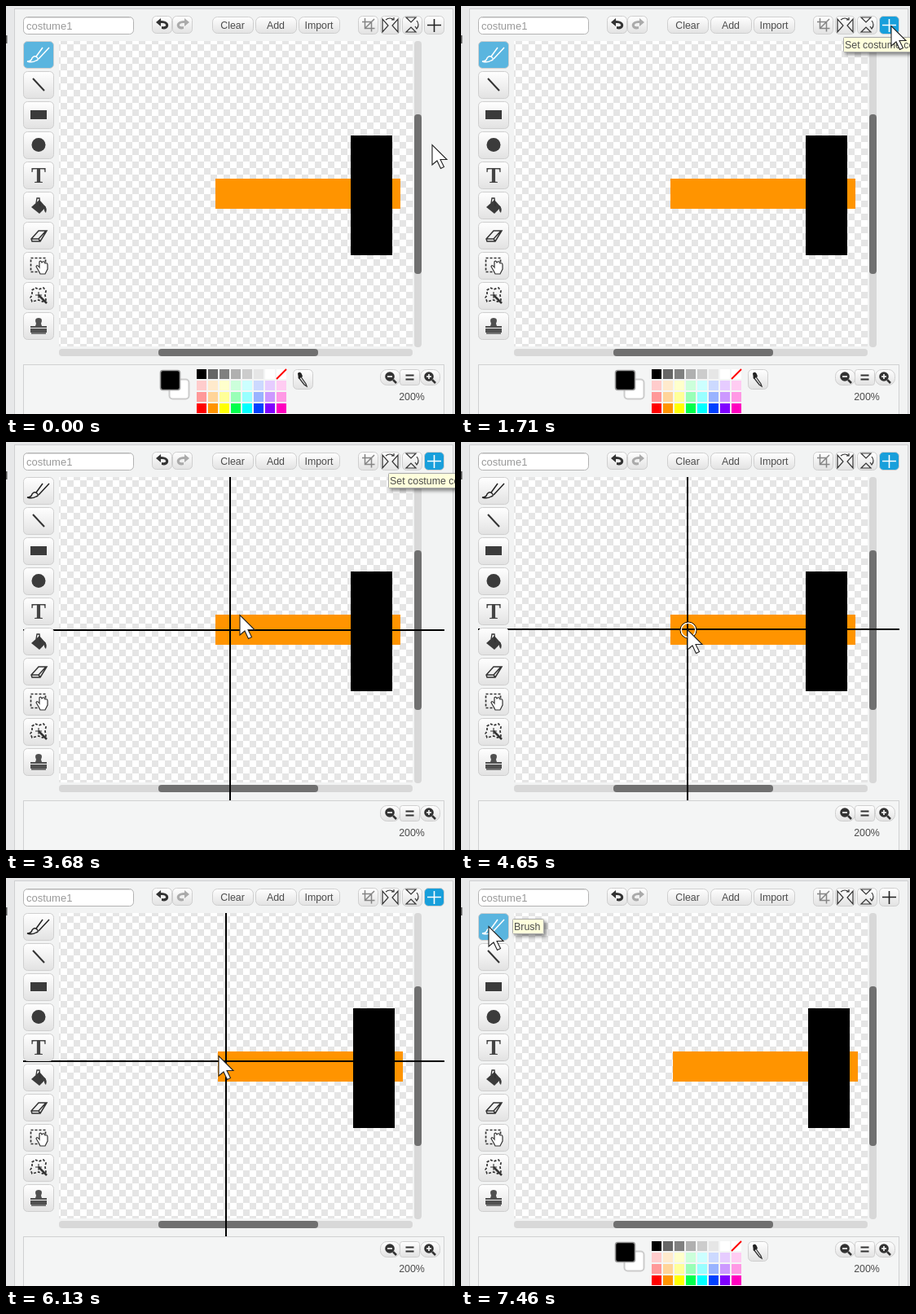
Animation of 551x501 px, one loop 8000 ms. Source, as an HTML page:

```html
<!DOCTYPE html>
<html lang="en">
<head>
<meta charset="utf-8">
<title>Set costume center</title>
<style>
  html, body { margin: 0; width: 100%; height: 100%; overflow: hidden; background: #e7e8e9; }
  svg { display: block; font-family: "Liberation Sans", Arial, sans-serif; font-size: 12.4px; }
</style>
</head>
<body>
<svg id="stage" width="551" height="501" viewBox="0 0 551 501">
  <defs>
    <linearGradient id="face" x2="0" y2="1">
      <stop offset="0" stop-color="#fff"/><stop offset="1" stop-color="#e2e2e2"/>
    </linearGradient>
    <pattern id="checker" x="51" y="31" width="16" height="16" patternUnits="userSpaceOnUse">
      <path fill="#fff" d="M0 0h16v16H0z"/><path fill="#e5e5e5" d="M8 0h8v8H8zM0 8h8v8H0z"/>
    </pattern>
    <filter id="shadow" x="-20%" y="-30%" width="150%" height="200%">
      <feDropShadow dx="3" dy="3" stdDeviation="2" flood-opacity=".45"/>
    </filter>
    <clipPath id="work"><path d="M65 43h434v375H65z"/></clipPath>
    <clipPath id="crossArea"><path d="M21 43h517v397H21z"/></clipPath>
  </defs>
</svg>
<script>
const stage = document.getElementById('stage');
const LOOP = 8000, HOVER = 1100, CLICK = 2330, PRESS = 4650, RELEASE = 5510, LEAVE = 6130, BRUSH = 7220;

const rect = (x, y, w, h, fill, r = 0, more = '') =>
  `<rect x="${x}" y="${y}" width="${w}" height="${h}" rx="${r}" fill="${fill}" ${more}/>`;
const button = (x, y, w, h, r = 5, id = '') =>
  rect(x + .5, y + .5, w - 1, h - 1, 'url(#face)', r, `stroke="#cfcfcf" ${id && `id="${id}"`}`);
const line = (d, color = '#333', width = 1.5, more = '') =>
  `<path d="${d}" fill="none" stroke="${color}" stroke-width="${width}" ${more}/>`;
const solid = (d, fill = '#3b3b3b', more = '') => `<path d="${d}" fill="${fill}" ${more}/>`;
const text = (x, y, s, more = '') => `<text x="${x}" y="${y}" fill="#4c4c4c" ${more}>${s}</text>`;
const group = (id, body, more = '') => `<g id="${id}" ${more}>${body}</g>`;

function topBar() {
  const labels = ['Clear', 'Add', 'Import'].map((s, i) =>
    button(253 + 53 * i, 13, 51, 21, 6) + text(278 + 53 * i, 28, s, 'text-anchor="middle"'));
  const undo = 'M184 20l6 -5v3c8 0 10 4 9 7c-1 3 -4 4 -8 3v-3c4 1 6 -1 5 -2c-1 -2 -3 -2 -6 -2v4z';
  const arrow = 'M462 16v16l7 -8z';
  return rect(21.5, 13.5, 135, 21, '#fff', 5, 'stroke="#b3b3b3"')
    + line('M24 14.5h130', '#ddd', 1) + text(25, 29, 'costume1', 'font-size="13" style="fill:#999"')
    + button(179, 12, 25, 22) + button(204, 12, 25, 22)
    + solid(undo, '#333') + solid(undo, '#aaa', 'transform="translate(409) scale(-1 1)"')
    + labels.join('')
    + [432, 459, 486].map(x => button(x, 12, 25, 23)).join('')
    + line('M437 19.5h11.500v12M440.500 15v12.500h12M441 27l11 -11', '#858585')
    + line(arrow, '#333', 1.2) + line(arrow, '#333', 1.2, 'transform="translate(943) scale(-1 1)"')
    + line('M466 17q5 -4 10 0M476 14v3h-3', '#333', 1.2)
    + line('M491 14h12l-6 6zM491 32h12l-6 -6zM504 18q4 5 0 10M506 25l-2 3l-2 -3', '#333', 1.2)
    + button(513, 12, 25, 23, 5, 'centerButton')
    + line('M525.500 16v16M517 23.500h17', '#222', 1.6, 'id="centerIcon"');
}

function tools() {
  const hand = 'M40 325l-3 -5q1 -3 4 1v-7q2 -2 3 1l1 -1q2 -1 3 2q3 -1 3 2v5l-3 6h-6z';
  const icons = line('M37 62L45 51M40 65L53 51', '', 1.5)
    + line('M26 68q5 0 6 -4q3 -4 6 -1q3 3 -1 4q-5 3 -11 1z', '', 1.4);
  return Array.from({ length: 10 }, (_, i) => button(21, 43 + 37 * i, 38, 34, 5, i ? '' : 'brushButton')).join('')
    + group('brushIcon', icons.replaceAll('stroke=""', ''))
    + line('M33 89L47 104', '#333', 2)
    + rect(30, 128, 20, 11, '#3b3b3b')
    + '<circle cx="40" cy="170.500" r="8.500" fill="#3b3b3b"/>'
    + text(40, 217, 'T', 'text-anchor="middle" style="fill:#444;font:bold 27px \'Liberation Serif\',serif"')
    + solid('M31 247l10 -9l8 9l-8 8z') + line('M37 242l1 -6h3l1 10', '#333', 1.3)
    + solid('M47 245q4 3 2 9q-3 -2 -2 -9z')
    + line('M31 286l9 -10h10l-8 13h-10zM31 286h9l2 3M40 286l9 -10', '#333', 1.5)
    + line('M30.500 309.500h18v17h-18z', '#333', 1.7, 'stroke-dasharray="3 2"')
    + solid(hand, '#fff', 'stroke="#333" stroke-width="1.2"')
    + line('M32 349l4 -3l4 2l6 -2l3 4l-1 5l1 6l-4 2l-5 -2l-8 2l-2 -5l2 -3z', '#333', 1.7, 'stroke-dasharray="3 2"')
    + line('M40 355l10 10', '#333', 2.5) + line('M36 355h8M40 351v8', '#333', 1.1)
    + solid('M30 396h20v5H30zM37 390q-3 -7 3 -7q6 0 3 7l1 3h6v2H30v-2h6z', '#505050')
    + line('M31 402h18', '#505050', 1.5);
}

function paintArea() {
  return rect(65, 43, 434, 375, 'url(#checker)')
    + group('costume', rect(257, 212, 227, 37, '#ff9400') + rect(423, 159, 51, 147, '#000'))
    + rect(501, 43, 9, 376, '#d8d8d8', 4) + rect(501, 133, 9, 196, '#707070', 4)
    + rect(65, 421, 434, 9, '#d8d8d8', 4) + rect(187, 421, 196, 9, '#707070', 4);
}

function palette() {
  const grays = [0, 102, 128, 176, 204, 230, 255];
  const hues = [[255, 0, 0], [255, 148, 0], [255, 255, 0], [0, 255, 76], [0, 255, 255], [0, 64, 255], [128, 0, 255], [255, 0, 191]];
  const swatch = (col, row, rgb) => rect(234 + 14 * col, 446 + 14 * row, 12, 12, `rgb(${rgb})`);
  const tints = [.8, .6, 0].map((white, row) =>
    hues.map((rgb, col) => swatch(col, row + 1, rgb.map(v => Math.round(v + (255 - v) * white)))).join(''));
  return rect(200.5, 458.5, 24, 24, '#fff', 4, 'stroke="#ccc" stroke-width="2"')
    + rect(189.5, 447.5, 24, 24, '#000', 3, 'stroke="#999" stroke-width="1.6"')
    + grays.map((v, i) => swatch(i, 0, [v, v, v])).join('') + swatch(7, 0, [255, 255, 255])
    + line('M332 458l12 -12', '#f00', 2) + tints.join('')
    + button(352, 446, 25, 25) + line('M361 454l7 10l1 3l-3 -2l-7 -9', '#333', 1.3)
    + solid('M358 451q3 -3 5 1l1 3l-5 3z', '#222');
}

function zoom() {
  const lens = (x, d) => `<circle cx="${x}" cy="455" r="5.800" fill="#333"/>`
    + line(`M${x + 4} 459l4 4`, '#333', 2.5) + line(d, '#fff', 1.6);
  return button(459, 446, 25, 20, 8) + button(483, 446, 25, 20, 3) + button(508, 446, 25, 20, 8)
    + lens(471, 'M468 455h6') + lens(519, 'M516 455h6M519 452v6')
    + line('M490.500 453.500h10M490.500 458.500h10', '#333', 2.2)
    + text(498, 484, '200%', 'text-anchor="middle"');
}

const tooltip = (id, x, y, w, s) => group(id,
  rect(x + .5, y + .5, w, 18, '#ffffdc', 1, 'stroke="#aaa" filter="url(#shadow)"') + text(x + 2, y + 14, s));

stage.insertAdjacentHTML('beforeend',
  rect(0, 0, 551, 501, '#e7e8e9')
  + rect(10.5, 3.5, 538, 520, '#f2f3f3', 0, 'stroke="#cfd0d1"')
  + rect(0, 36, 1.5, 10, '#555')
  + rect(21.5, 440.5, 516, 80, '#f4f5f5', 0, 'stroke="#d0d1d2"')
  + topBar() + paintArea()
  + group('cross', line('', '#000', 2, 'id="crossLines"'), 'clip-path="url(#crossArea)"')
  + tools() + group('palette', palette()) + zoom()
  + group('ring', '<circle r="10" stroke="#000"/><circle r="8.800" stroke="#fff" stroke-width="1.400"/>', 'fill="none"')
  + tooltip('centerTip', 469, 38, 111, 'Set costume center') + tooltip('brushTip', 63, 50, 38, 'Brush')
  + solid('M0 .500V25l6 -5l4.500 9.500l4 -2l-4.500 -9h8z', '#fff', 'id="cursor" stroke="#222" stroke-width="1.100"'));

const el = id => document.getElementById(id);
const show = (id, on) => el(id).setAttribute('display', on ? 'inline' : 'none');
const place = (id, x, y) => el(id).setAttribute('transform', `translate(${x} ${y})`);

// First step, last step, number of steps, destination x and y.
const moves = [
  [490, 1220, 7, 528, 27], [1470, 1470, 1, 528, 24], [2950, 3680, 7, 287, 212],
  [3800, 4160, 4, 273, 239], [4280, 4400, 2, 278, 230], [4890, 5260, 4, 272, 230],
  [6130, 6130, 1, 261, 218], [6250, 6740, 5, 9, 49], [6860, 6860, 1, 13, 53],
  [6980, 7460, 5, 34, 59]
];

function cursorAt(t) {
  let x = 523, y = 170;
  for (const [from, to, steps, endX, endY] of moves) {
    if (t < from) break;
    const gap = (to - from) / (steps - 1) || 1;
    const u = Math.min(1, (Math.floor((t - from + 3) / gap) + 1) / steps);
    const eased = u * u * (3 - 2 * u);
    x += Math.round((endX - x) * eased);
    y += Math.round((endY - y) * eased);
  }
  return [x, y];
}

function crossAt(t, x, y) {
  if (t < PRESS) return [275, 231];
  return t < LEAVE ? [x, y] : [Math.max(22, x + 9), y + 7];
}

function draw(t) {
  const [x, y] = cursorAt(t);
  const [cx, cy] = crossAt(t, x, y);
  const centering = t >= CLICK && t < BRUSH;
  const lit = t >= HOVER && t < BRUSH;
  const moved = t >= RELEASE;
  place('cursor', x, y);
  place('ring', x + 1, y + 1);
  place('costume', moved ? 3 : 0, moved ? 1 : 0);
  el('crossLines').setAttribute('d', `M21 ${cy}H538M${cx} 43V440`);
  show('cross', centering);
  show('palette', !centering);
  show('ring', t >= PRESS && t < RELEASE);
  show('centerTip', t >= 1710 && t < 4040);
  show('brushTip', t >= 7340);
  el('centerButton').setAttribute('fill', lit ? '#189fdb' : 'url(#face)');
  el('centerIcon').setAttribute('stroke', lit ? '#fff' : '#222');
  el('brushButton').setAttribute('fill', centering ? 'url(#face)' : '#5ab5df');
  el('brushIcon').setAttribute('stroke', centering ? '#222' : '#fff');
}

const start = performance.now();
function tick() {
  draw((performance.now() - start) % LOOP);
  requestAnimationFrame(tick);
}
tick();
</script>
</body>
</html>
```
